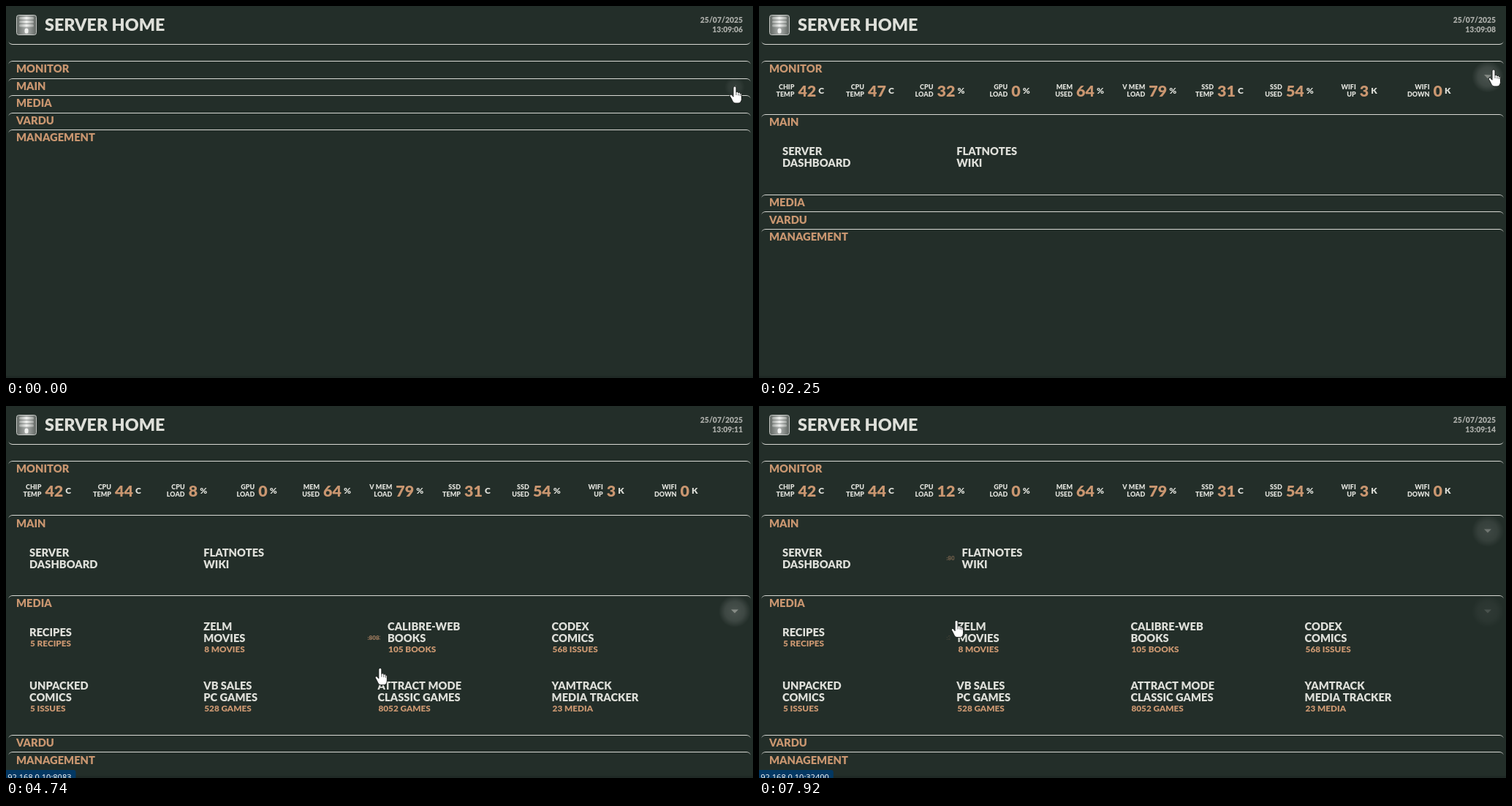
An HTML page with a canvas that plays this animation: 1022 px wide and 509 px high, repeating every 8000 ms.

```html
<!DOCTYPE html>
<html lang="en">
<head>
<meta charset="utf-8">
<title>Server Home</title>
<style>
  html, body { margin: 0; width: 100%; height: 100%; overflow: hidden; background: #232e29; }
  canvas { display: block; }
</style>
</head>
<body>
<canvas id="stage" width="1022" height="509"></canvas>
<script>
const ctx = document.getElementById('stage').getContext('2d');
const LOOP = 8000, STEP = 131.8, FADE = 300;
const TITLE_H = 23.5, ROW = 81, COLUMN = 238.2;
const ORANGE = '#c99670', CREAM = '#dedfd9', LINE = '#d8d9d4', HOST = '192.168.0.10';

// Pointer moves: start, end, destination
const START = { x: 1060, y: 110 };
const MOVES = [
  [-200, -80, 997, 110], [50, 400, 1008, 120], [400, 790, 1005, 108], [1500, 1860, 1005, 87],
  [2380, 2920, 1001, 268], [3830, 5150, 370, 385], [5350, 5540, 194, 380],
  [5930, 6560, 95, 229], [7010, 7530, 285, 222], [7680, 7920, 270, 294]
];

const tile = (lines, sub, label, url) => ({ lines: lines.split('|'), sub, label, url });
const SECTIONS = [
  { name: 'MONITOR', opens: 2040, grow: 50.7, tiles: [] },
  { name: 'MAIN', opens: 1298, tiles: [
    tile('SERVER|DASHBOARD', '', '\\DASHBOARD', HOST + ':8080/dashboard/'),
    tile('FLATNOTES|WIKI', '', ':8050', HOST + ':8050')
  ] },
  { name: 'MEDIA', opens: 3130, tiles: [
    tile('RECIPES', '5 RECIPES', '\\RECIPES', HOST + ':8080/recipes'),
    tile('ZELM|MOVIES', '8 MOVIES', ':32400', HOST + ':32400'),
    tile('CALIBRE-WEB|BOOKS', '105 BOOKS', ':8083', HOST + ':8083'),
    tile('CODEX|COMICS', '568 ISSUES', ':9810', HOST + ':9810'),
    tile('UNPACKED|COMICS', '5 ISSUES', '\\COMICS', HOST + ':8080/comics'),
    tile('VB SALES|PC GAMES', '528 GAMES', '//VB.SALES', 'https://vb.sales'),
    tile('ATTRACT MODE|CLASSIC GAMES', '8052 GAMES', '\\GAMES', HOST + ':8080/games'),
    tile('YAMTRACK|MEDIA TRACKER', '23 MEDIA', ':8000', HOST + ':8000')
  ] },
  { name: 'VARDU', tiles: [] },
  { name: 'MANAGEMENT', tiles: [] }
];

// Label, unit and successive readings
const GAUGES = [
  ['CHIP|TEMP', 'C', 42], ['CPU|TEMP', 'C', 47, 44, 45, 45, 44], ['CPU|LOAD', '%', 32, 8, 8, 10, 12],
  ['GPU|LOAD', '%', 0], ['MEM|USED', '%', 64], ['V MEM|LOAD', '%', 79], ['SSD|TEMP', 'C', 31],
  ['SSD|USED', '%', 54], ['WIFI|UP', 'K', 3], ['WIFI|DOWN', 'K', 0, 0, 0, 1, 0]
];

const clamp = v => Math.max(0, Math.min(1, v));
const smooth = v => v * v * (3 - 2 * v);
const easeOut = v => 1 - (1 - v) ** 3;

function pointerAt(t) {
  let { x, y } = START;
  for (const [from, to, endX, endY] of MOVES) {
    const k = smooth(clamp((t - from) / (to - from)));
    x += (endX - x) * k;
    y += (endY - y) * k;
  }
  return { x, y };
}

function layout(t) {
  let y = 75.2;
  return SECTIONS.map(({ opens, grow, tiles }) => {
    const open = opens ? easeOut(clamp((t - opens) / 280)) : 0;
    const extra = grow || 86.2 + ROW * (Math.ceil(tiles.length / 4) - 1);
    const box = { y, open, height: TITLE_H + extra * open };
    y += box.height;
    return box;
  });
}

const tileX = i => 32 + COLUMN * (i % 4);
const tileY = (i, titleY) => titleY + 47.5 + ROW * Math.floor(i / 4);
const titleCentre = y => Math.round(y + 11.25);

// What lies under the pointer at time t
function hovered(t) {
  const { x, y } = pointerAt(t);
  const boxes = layout(t);
  const s = boxes.findIndex(b => x < 1022 && y >= b.y && y < b.y + b.height);
  if (s < 0) return {};
  const titleY = titleCentre(boxes[s].y);
  const item = SECTIONS[s].tiles.find((_, i) =>
    x >= tileX(i) - 15 && x < tileX(i) - 15 + COLUMN && Math.abs(y - tileY(i, titleY)) < 36);
  return { section: SECTIONS[s], item };
}

// Hover levels rise and fall linearly: the share of the last FADE ms spent on each thing.
function hoverLevels(t) {
  const levels = new Map(), samples = 30;
  for (let i = 0; i < samples; i++) {
    const { section, item } = hovered(t - i * FADE / samples);
    for (const key of [section, item]) levels.set(key, (levels.get(key) || 0) + 1 / samples);
  }
  return key => levels.get(key) || 0;
}

function font(size, weight = 900, family = 'Lato') {
  ctx.font = `${weight} ${size}px ${family}, sans-serif`;
}

function widthOf(str, size) {
  font(size);
  return ctx.measureText(str).width;
}

// Draws text with its capitals centred on cy.
function text(str, x, cy, size, color, align = 'left') {
  font(size);
  ctx.textAlign = align;
  ctx.fillStyle = color;
  ctx.fillText(str, x, Math.round(cy + size * 0.36));
}

// A one pixel rule whose ends curl and taper away; dir 1 curls down, -1 up.
function rule(y, dir) {
  ctx.save();
  ctx.translate(0, y);
  ctx.scale(1, dir);
  ctx.beginPath();
  ctx.ellipse(9, 6, 6, 6, 0, Math.PI, 1.5 * Math.PI);
  ctx.ellipse(1013, 6, 6, 6, 0, 1.5 * Math.PI, 2 * Math.PI);
  ctx.ellipse(1013, 6, 6, 5, 0, 0, -0.5 * Math.PI, true);
  ctx.ellipse(9, 6, 6, 5, 0, 1.5 * Math.PI, Math.PI, true);
  ctx.fillStyle = LINE;
  ctx.fill();
  ctx.restore();
}

function metal(edge, middle) {
  const gradient = ctx.createLinearGradient(15, 0, 41, 0);
  gradient.addColorStop(0, edge);
  gradient.addColorStop(0.5, middle);
  gradient.addColorStop(1, edge);
  return gradient;
}

function roundBox(x, y, w, h, r, fill) {
  ctx.beginPath();
  ctx.roundRect(x, y, w, h, r);
  ctx.fillStyle = fill;
  ctx.fill();
}

function header(t) {
  roundBox(14.5, 12.5, 27, 27, 3, metal('#626864', '#aeb1af'));
  ctx.strokeStyle = '#c4c7c4';
  ctx.lineWidth = 1;
  ctx.stroke();
  for (let i = 0; i < 3; i++) roundBox(18, 15 + 5 * i, 20, 3.5, 1.5, metal('#858a86', '#f0f1ef'));
  roundBox(25.5, 30.5, 5, 7, 2.5, '#f2f3f1');

  text('SERVER HOME', 53, 26, 23.3, CREAM);
  const seconds = Math.max(6, 8 + Math.floor((t - 1310) / 1000));
  text('25/07/2025', 1008, 19, 10.4, '#abada9', 'right');
  text('13:09:' + String(seconds).padStart(2, '0'), 1008, 32, 10.4, '#abada9', 'right');
  rule(53, -1);
}

function monitor(cy, t) {
  const update = Math.max(0, 1 + Math.floor((t - 3815) / 1200));
  GAUGES.forEach(([label, unit, ...readings], i) => {
    const lines = label.split('|');
    const value = readings[Math.min(update, readings.length - 1)];
    const labelW = Math.max(...lines.map(s => widthOf(s, 9)));
    const valueW = widthOf(value, 21.5);
    const x = 56.3 + 95.6 * i - (labelW + valueW + widthOf(unit, 12) + 8) / 2 + labelW;
    lines.forEach((s, n) => text(s, x, cy - 5 + n * 10, 9, CREAM, 'right'));
    text(value, x + 5, cy, 21.5, ORANGE);
    text(unit, x + valueW + 8, cy, 12, CREAM);
  });
}

function drawTile(item, x, cy, level) {
  const shown = level * widthOf(item.label, 8.2);
  const shift = Math.max(0, shown - 4);
  if (shift) {
    ctx.save();
    ctx.beginPath();
    ctx.rect(x - 14, cy - 10, shown, 20);
    ctx.clip();
    ctx.globalAlpha = 0.9 * level;
    text(item.label, x - 14, cy - 0.5, 8.2, ORANGE);
    ctx.restore();
  }
  const height = 16 * (item.lines.length - 1) + (item.sub ? 15 : 0);
  const top = cy - height / 2;
  item.lines.forEach((s, n) => text(s, x + shift, top + 16 * n, 14.7, CREAM));
  text(item.sub, x + shift + 1, top + height, 11.8, ORANGE);
}

function toggle(y, open, level) {
  const r = 14 + 8 * open;
  ctx.save();
  ctx.globalAlpha = smooth(level);
  ctx.translate(997, y + 12 + 10 * open);
  const glow = ctx.createRadialGradient(0, 0, 0, 0, 0, r);
  glow.addColorStop(0, 'rgba(255,255,255,.18)');
  glow.addColorStop(0.6, 'rgba(255,255,255,.12)');
  glow.addColorStop(1, 'rgba(255,255,255,0)');
  ctx.fillStyle = glow;
  ctx.fillRect(-r, -r, 2 * r, 2 * r);
  ctx.rotate((1 - open) * Math.PI / 2);
  ctx.scale(r / 22, r / 22);
  ctx.fillStyle = '#868b86';
  ctx.fill(new Path2D('M-5-2.5H5L0 2.5Z'));
  ctx.restore();
}

function sections(t) {
  const level = hoverLevels(t);
  layout(t).forEach(({ y, open, height }, n) => {
    const section = SECTIONS[n], top = Math.round(y), titleY = titleCentre(y);
    rule(top, 1);
    ctx.save();
    ctx.beginPath();
    ctx.rect(0, top, 1022, height);
    ctx.clip();
    if (open) {
      if (section.name === 'MONITOR') monitor(titleY + 30, t);
      section.tiles.forEach((item, i) => drawTile(item, tileX(i), tileY(i, titleY), level(item)));
    }
    ctx.restore();
    text(section.name, 14, titleY, 14.7, ORANGE);
    toggle(top, open, level(section));
  });
}

// The address of the last hovered tile stays in the corner.
function statusBar(t) {
  let item;
  for (let past = t; past > 0 && !item; past -= 10) item = hovered(past).item;
  if (!item) return;
  font(11, 400, "'Open Sans'");
  roundBox(-5, 498, ctx.measureText(item.url).width + 7, 20, 3, '#033863');
  ctx.textAlign = 'left';
  ctx.fillStyle = '#fff';
  ctx.fillText(item.url, -4, 512);
}

const HAND = new Path2D('M-2 2C-2-.7 2-.7 2 2V8C3 6.6 5 7 5 9C6 7.6 7.6 8 7.6 10C8.6 9 9.5 9.8 9.5 12' +
  'V16C9.5 20 8 23 5 23H1C-2 23-3 20-4.5 17L-6.5 13.5C-7.3 11.5-5 10.3-3.7 12L-2 14.2Z');
const KNUCKLES = new Path2D('M2 8V12M5 9.5V12.5M7.6 10.5V13');

function pointer(t) {
  const { x, y } = pointerAt(t);
  ctx.save();
  ctx.translate(x, y);
  ctx.fillStyle = '#fff';
  ctx.strokeStyle = '#161b18';
  ctx.lineWidth = 1;
  ctx.fill(HAND);
  ctx.stroke(HAND);
  ctx.lineWidth = 0.7;
  ctx.stroke(KNUCKLES);
  ctx.restore();
}

function frame(now) {
  // The screen updates in even steps.
  const t = Math.floor((now % LOOP + 30) / STEP) * STEP;
  ctx.fillStyle = '#232e29';
  ctx.fillRect(0, 0, 1022, 509);
  ctx.fillStyle = '#1f2925';
  ctx.fillRect(0, 506, 1022, 3);
  header(t);
  sections(t);
  statusBar(t);
  pointer(t);
  requestAnimationFrame(frame);
}
requestAnimationFrame(frame);
</script>
</body>
</html>
```
